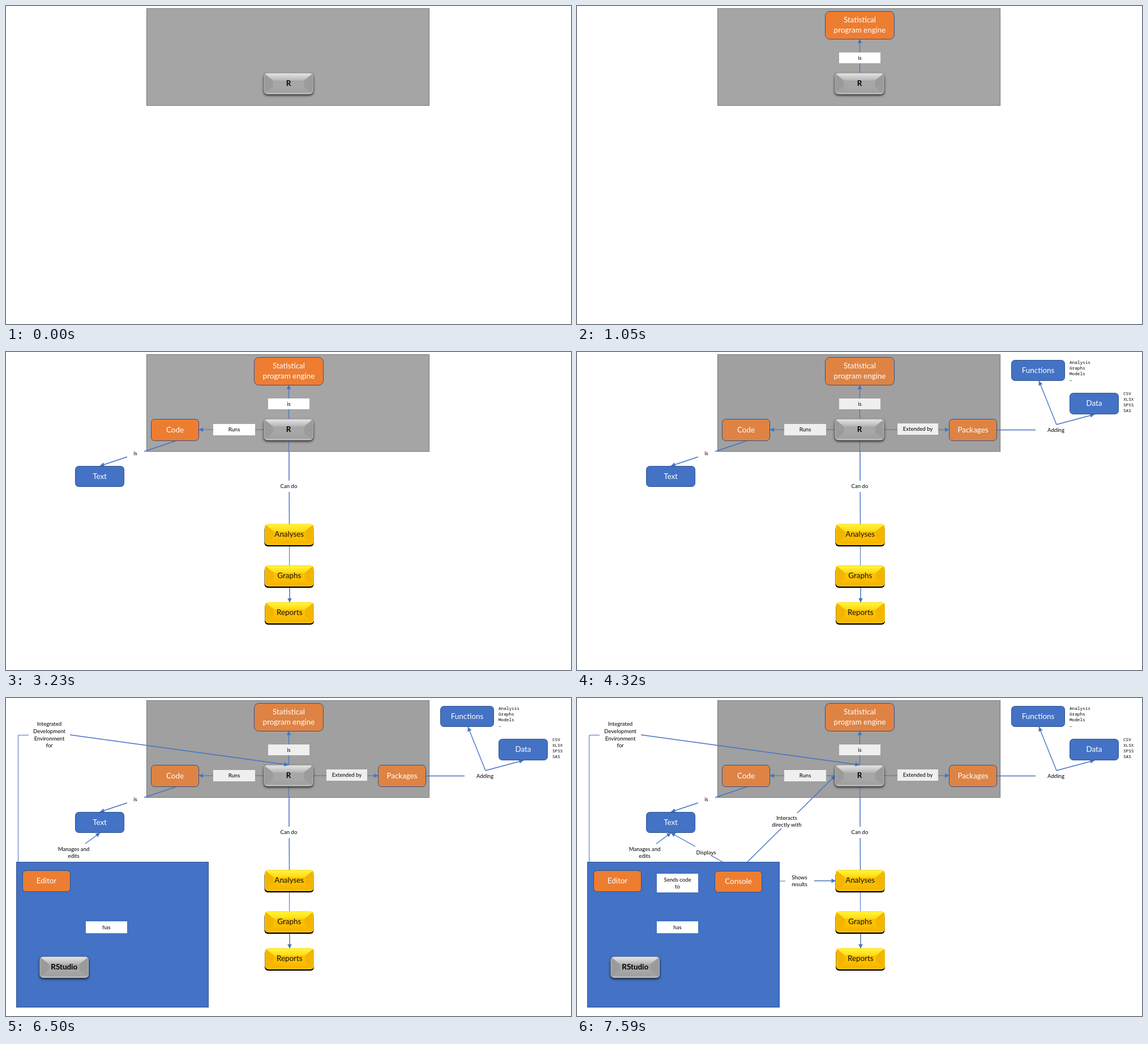
Write an HTML page with a canvas that moves like this. It is 998 by 561 pixels and loops after 8 s.

```html
<!DOCTYPE html>
<html lang="en">
<head>
<meta charset="utf-8">
<title>Concept map of R</title>
<style>
html, body { margin: 0; width: 100%; height: 100%; overflow: hidden; background: #fff; }
canvas { display: block; }
</style>
</head>
<body>
<canvas id="stage" width="998" height="561"></canvas>
<script>
const ctx = document.getElementById('stage').getContext('2d');
const LOOP = 8000;
const STEPS = [1050, 2140, 3230, 4320, 5410, 6500, 7590];
const BLUE = '#4472c4', EDGE = '#2f528f', ORANGE = '#ed7d31';
const SANS = 'Lato, Carlito, sans-serif', MONO = '"Noto Sans Mono", monospace';

const GRAY = { top: '#e6e6e6', topEnd: '#b4b4b4', side: '#9b9b9b', face: '#a7a7a7', low: '#a0a0a0', rim: '#cfcfcf', ink: '#000' };
const STEEL = { top: '#ccd2de', topEnd: '#a3abba', side: '#8792a8', face: '#949db0', low: '#8d97ab', rim: '#bac3d3', ink: '#111' };
const GOLD = { top: '#fff838', topEnd: '#ffd916', side: '#f3b600', face: '#ffc000', low: '#f4b400', rim: '#ffd020', ink: '#111' };

function text(str, x, y, size = 9.6, color = '#000', weight = 400, family = SANS, align = 'center') {
  ctx.font = `${weight} ${size}px ${family}`;
  ctx.textAlign = align;
  ctx.fillStyle = color;
  ctx.fillText(str, x, y + size * 0.35);
}

function lines(rows, x, y, gap = 12.6) {
  rows.forEach((row, i) => text(row, x, y + i * gap));
}

function list(rows, x, y) {
  rows.forEach((row, i) => text(row, x, y + i * 10.1, 7.7, '#000', 400, MONO, 'left'));
}

function rounded(x, y, w, h, r) {
  ctx.beginPath();
  ctx.roundRect(x, y, w, h, r);
}

function poly(points, fill) {
  ctx.beginPath();
  points.forEach(([x, y]) => ctx.lineTo(x, y));
  ctx.closePath();
  ctx.fillStyle = fill;
  ctx.fill();
}

function panel(x, y, w, h, fill, edge) {
  ctx.fillStyle = fill;
  ctx.fillRect(x, y, w, h);
  ctx.strokeStyle = edge;
  ctx.lineWidth = 1;
  ctx.strokeRect(x + 0.5, y + 0.5, w - 1, h - 1);
}

function box(x, y, w, h, fill, rows, r = 6) {
  rounded(x + 0.5, y + 0.5, w - 1, h - 1, r);
  ctx.fillStyle = fill;
  ctx.fill();
  ctx.strokeStyle = EDGE;
  ctx.lineWidth = 1;
  ctx.stroke();
  const first = y + h / 2 - 0.5 - (rows.length - 1) * 9;
  rows.forEach((row, i) => text(row, x + w / 2, first + i * 18, 13.4, '#fff'));
}

function label(x, y, w, h, rows, fill = '#fff') {
  ctx.fillStyle = fill;
  ctx.fillRect(x, y, w, h);
  lines(rows, x + w / 2, y + h / 2 - (rows.length - 1) * 6.3);
}

function path(points, arrow = false, width = 1.4) {
  ctx.beginPath();
  points.forEach(([x, y]) => ctx.lineTo(x, y));
  ctx.strokeStyle = BLUE;
  ctx.lineWidth = width;
  ctx.stroke();
  if (!arrow) return;
  const [[ax, ay], [bx, by]] = points.slice(-2);
  const len = Math.hypot(bx - ax, by - ay);
  const ux = (bx - ax) / len, uy = (by - ay) / len;
  const cx = bx - ux * 7.5, cy = by - uy * 7.5;
  poly([[bx, by], [cx - uy * 3.8, cy + ux * 3.8], [cx + uy * 3.8, cy - ux * 3.8]], BLUE);
}

function bevel(x, y, w, h, tone, name, weight) {
  const r = x + w, b = y + h, dx = 16, dy = 13;
  ctx.save();
  if (tone === GOLD) {
    rounded(x - 0.5, y + 3, w + 0.5, h - 0.5, 6);
    ctx.fillStyle = '#000';
    ctx.fill();
  } else {
    ctx.shadowColor = 'rgba(0,0,0,.85)';
    ctx.shadowBlur = 4;
    ctx.shadowOffsetY = 2;
  }
  rounded(x, y, w, h, 6);
  ctx.fillStyle = tone.face;
  ctx.fill();
  ctx.shadowColor = 'transparent';
  ctx.clip();

  const shine = ctx.createLinearGradient(0, y, 0, y + dy);
  shine.addColorStop(0, tone.top);
  shine.addColorStop(1, tone.topEnd);
  poly([[x, y], [r, y], [r - dx, y + dy], [x + dx, y + dy]], shine);
  poly([[x, y], [x + dx, y + dy], [x + dx, b - dy], [x, b]], tone.side);
  poly([[r, y], [r - dx, y + dy], [r - dx, b - dy], [r, b]], tone.side);
  const base = ctx.createLinearGradient(0, b - dy, 0, b);
  base.addColorStop(0, tone.face);
  base.addColorStop(0.75, tone.low);
  base.addColorStop(1, tone.rim);
  poly([[x, b], [r, b], [r - dx, b - dy], [x + dx, b - dy]], base);
  rounded(x + 0.5, y + 0.5, w - 1, h - 1, 6);
  ctx.strokeStyle = tone.rim;
  ctx.globalAlpha = 0.6;
  ctx.lineWidth = 1;
  ctx.stroke();
  ctx.restore();
  text(name, x + w / 2, y + h / 2 - 0.5, 13.4, tone.ink, weight);
}

function drawEngine(orange, tag) {
  path([[499.5, 118], [499.5, 58]], true, 1.2);
  label(463, 82, 73, 19, ['is'], tag);
  box(438, 9, 123, 50, orange, ['Statistical', 'program engine'], 8);
}

function drawResults() {
  path([[499.5, 157], [499.5, 176]], false, 1);
  path([[500, 176], [500, 227]], false, 1.5);
  path([[500.2, 247], [500.5, 304]]);
  path([[500.5, 342], [500.5, 377]], false, 1);
  path([[501, 415], [501, 442]], true, 1.5);
  text('Can do', 499.5, 237);
  bevel(457, 303.5, 86.5, 37, GOLD, 'Analyses', 400);
  bevel(457, 376.5, 86.5, 37, GOLD, 'Graphs', 400);
  bevel(457.5, 441.5, 86.5, 37, GOLD, 'Reports', 400);
}

function drawCode(orange, tag) {
  path([[456, 137], [340.5, 137]], true, 1.2);
  label(366, 127, 74, 20, ['Runs'], tag);
  path([[299, 157], [244, 175.5]]);
  path([[214, 185], [166, 201]], true);
  text('is', 228.5, 179);
  box(256, 118, 85, 39, orange, ['Code']);
  box(122, 201, 87, 37, BLUE, ['Text']);
}

function drawPackages(orange, tag) {
  path([[543, 137], [657.5, 137]], true, 1.2);
  label(566, 126, 72, 20, ['Extended by'], tag);
  path([[742, 137.5], [810, 137.5]], false, 1.5);
  text('Adding', 846, 138);
  path([[847, 128], [816, 51]], true);
  path([[847, 128], [914, 110]], true);
  box(657, 118, 85, 39, orange, ['Packages']);
  box(767, 14, 95, 37, BLUE, ['Functions']);
  box(870, 72, 87, 38, BLUE, ['Data']);
  list(['Analysis', 'Graphs', 'Models', '…'], 870, 18.5);
  list(['CSV', 'XLSX', 'SPSS', 'SAS'], 965, 73.5);
}

function drawStudio(tone) {
  path([[21.5, 290], [21.5, 65.5], [40, 65.5]], false, 1);
  path([[113, 65], [499, 118]], true);
  lines(['Integrated', 'Development', 'Environment', 'for'], 76.5, 46);
  panel(18, 289, 340, 257, BLUE, EDGE);
  bevel(59.5, 456.5, 86.5, 37, tone, 'RStudio', 700);
}

function drawEditor() {
  path([[140, 257], [166, 238]], true);
  lines(['Manages and', 'edits'], 119.5, 266.5);
  box(29, 304, 85, 38, ORANGE, ['Editor']);
  label(141, 394, 73, 21, ['has']);
}

function drawConsole() {
  path([[257, 289], [236, 277.5]]);
  path([[209, 262], [166, 238]], true);
  text('Displays', 228, 272.5);
  path([[301, 289], [361, 230]]);
  path([[389, 203], [456, 137]], true);
  lines(['Interacts', 'directly with'], 370.5, 211.5);
  path([[358, 323], [368, 323]], false, 1);
  path([[419, 322.5], [457, 322.5]], true);
  lines(['Shows', 'results'], 393, 316.5);
  label(141, 310, 73, 33, ['Sends code', 'to']);
  box(243, 305, 84, 38, ORANGE, ['Console']);
}

function draw(step) {
  const muted = step >= 4;
  const orange = muted ? '#de8344' : ORANGE;
  const tag = muted ? '#efefef' : '#fff';
  ctx.fillStyle = '#fff';
  ctx.fillRect(0, 0, 998, 561);
  panel(248, 4, 500, 172, muted ? '#a0a0a0' : '#a5a5a5', '#787878');
  if (step >= 1) drawEngine(orange, tag);
  if (step >= 2) drawResults();
  if (step >= 3) drawCode(orange, tag);
  if (step >= 4) drawPackages(orange, tag);
  if (step >= 5) drawStudio(step === 5 ? STEEL : GRAY);
  if (step >= 6) drawEditor();
  if (step >= 7) drawConsole();
  bevel(455.5, 118.5, 87, 37, GRAY, 'R', 700);
  if (step >= 5) path([[491.7, 117], [499, 118]], true);
}

function frame() {
  const time = performance.now() % LOOP;
  draw(STEPS.filter(start => time >= start).length);
  requestAnimationFrame(frame);
}
frame();
</script>
</body>
</html>
```
